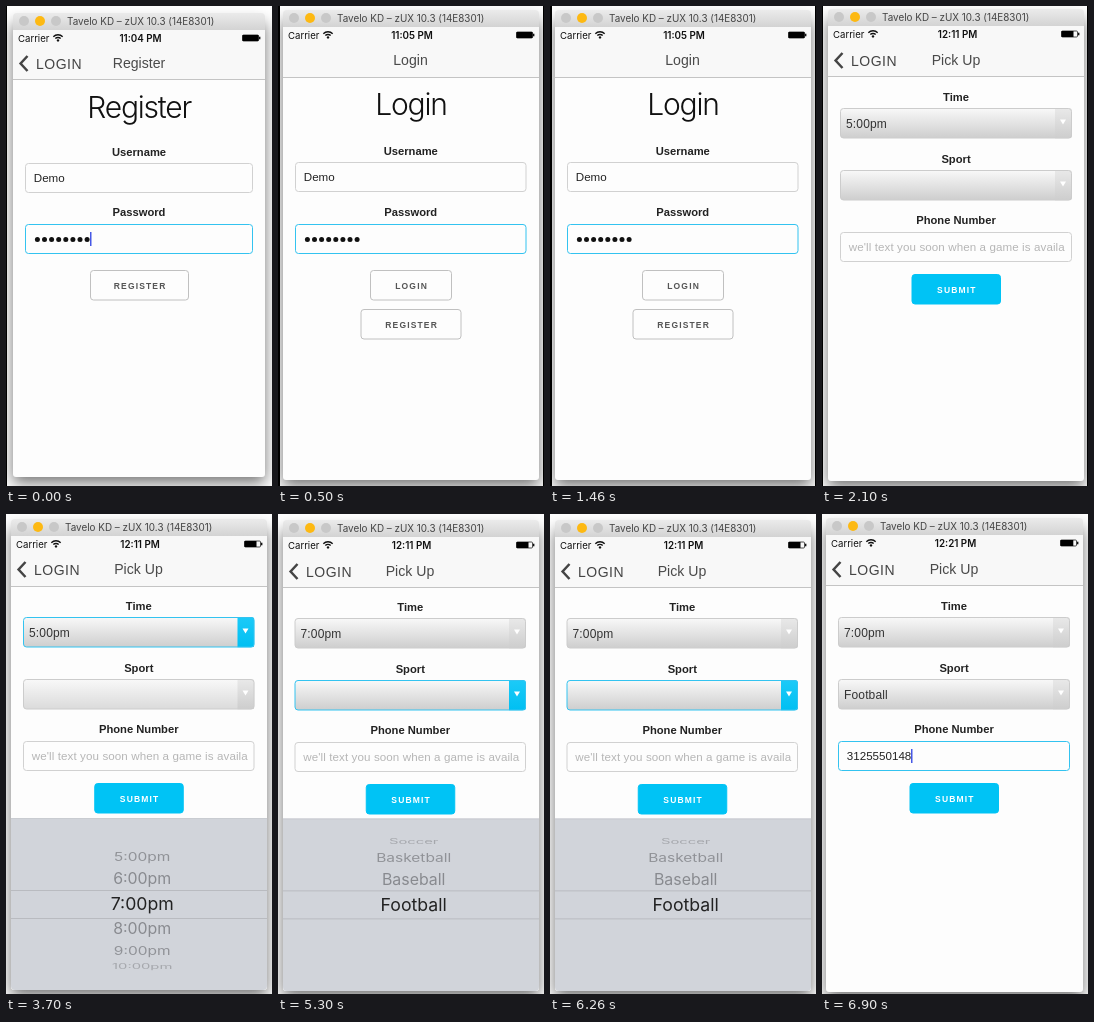
These frames come from a looping animation (266x480 px, 8000 ms). An HTML page with a canvas:

```html
<!DOCTYPE html>
<html lang="en">
<head>
<meta charset="utf-8">
<title>Pick-up game app</title>
<style>
html, body { margin: 0; width: 100%; height: 100%; overflow: hidden; background: #fff; }
canvas { display: block; width: 266px; height: 480px; }
</style>
</head>
<body>
<canvas id="stage"></canvas>
<script>
const W = 266, H = 480, LOOP = 8000;
const SANS = '"Liberation Sans", Arial, sans-serif';
const UI = 'Inter, Roboto, sans-serif';
const CYAN = '#00c3f5', FOCUS = '#33c3f0', INK = '#222';
const canvas = document.getElementById('stage');
const ctx = canvas.getContext('2d');
const dpr = window.devicePixelRatio || 1;
canvas.width = Math.round(W * dpr);
canvas.height = Math.round(H * dpr);

// y is the middle of the capitals
function text(str, x, y, size, o = {}) {
  ctx.font = `${o.weight || 400} ${size}px ${o.font || SANS}`;
  ctx.textAlign = o.align || 'center';
  ctx.letterSpacing = (o.gap || 0) + 'px';
  ctx.fillStyle = o.color || INK;
  ctx.fillText(str, x, y + size * 0.36);
  ctx.letterSpacing = '0px';
}

function rect(x0, y0, x1, y1, fill) {
  ctx.fillStyle = fill;
  ctx.fillRect(x0, y0, x1 - x0, y1 - y0);
}

function rounded(x0, y0, x1, y1, radii, fill) {
  ctx.beginPath();
  ctx.roundRect(x0, y0, x1 - x0, y1 - y0, radii);
  ctx.fillStyle = fill;
  ctx.fill();
}

function box(x0, y0, x1, y1, fill, stroke) {
  ctx.beginPath();
  ctx.roundRect(x0 + 0.5, y0 + 0.5, x1 - x0 - 1, y1 - y0 - 1, 3);
  if (fill) { ctx.fillStyle = fill; ctx.fill(); }
  if (stroke) { ctx.strokeStyle = stroke; ctx.lineWidth = 1; ctx.stroke(); }
}

function dot(x, y, r, fill) {
  ctx.beginPath();
  ctx.arc(x, y, r, 0, Math.PI * 2);
  ctx.fillStyle = fill;
  ctx.fill();
}

function shade(y0, y1, a, b) {
  const g = ctx.createLinearGradient(0, y0, 0, y1);
  g.addColorStop(0, a);
  g.addColorStop(1, b);
  return g;
}

function line(points, color, width) {
  ctx.beginPath();
  points.forEach(([x, y]) => ctx.lineTo(x, y));
  ctx.strokeStyle = color;
  ctx.lineWidth = width;
  ctx.stroke();
}

function wifi(x, y) {
  ctx.strokeStyle = '#111';
  ctx.lineWidth = 1.4;
  for (const r of [3.8, 6.6]) {
    ctx.beginPath();
    ctx.arc(x, y, r, -Math.PI * 0.75, -Math.PI * 0.25);
    ctx.stroke();
  }
  dot(x, y - 0.9, 1.2, '#111');
}

function battery(right, y, level) {
  const left = right - 19;
  ctx.beginPath();
  ctx.roundRect(left + 0.5, y - 3, 16, 6, 1);
  ctx.strokeStyle = '#222';
  ctx.lineWidth = 0.8;
  ctx.stroke();
  rect(left + 0.5, y - 3, left + 0.5 + 16 * level, y + 3, '#000');
  rect(right - 2, y - 1.3, right - 0.6, y + 1.3, '#111');
}

function chrome(s) {
  const [x0, x1, bottom] = s.win, t = s.top, top = t - 8, mid = s.mid;
  rect(0, 0, W, H, '#fff');
  ctx.save();
  ctx.shadowColor = 'rgba(0,0,0,.55)';
  ctx.shadowBlur = 15 * dpr;
  ctx.shadowOffsetY = 6 * dpr;
  rounded(x0, top + 4, x1, bottom, [0, 0, 3, 3], '#fdfdfd');
  ctx.restore();

  rounded(x0, top, x1, top + 17, [4, 4, 0, 0], shade(top, top + 17, '#ebebeb', '#d3d3d3'));
  ['#c8c8c8', '#fdb913', '#c8c8c8'].forEach((c, i) => dot(x0 + 11 + 16 * i, t, 5, c));
  text('Tavelo KD – zUX 10.3 (14E8301)', x0 + 54, t, 9.9, { font: UI, align: 'left', color: '#444' });

  rect(x0, t + 9, x1, s.rule, '#f8f8f8');
  rect(x0, s.rule - 1, x1, s.rule, '#c4c4c4');
  text('Carrier', x0 + 5, t + 17.3, 9.6, { font: UI, align: 'left', color: '#111' });
  wifi(x0 + 45, t + 20.3);
  text(s.clock, mid + 1.5, t + 17.3, 9.8, { font: UI, weight: 600, color: '#111' });
  battery(x1 - 4, t + 17, s.charge);

  text(s.title, mid, s.bar, 14.1, { color: '#4a4a4a' });
  if (s.back) {
    line([[x0 + 14.5, s.bar - 7], [x0 + 7.6, s.bar + 0.5], [x0 + 14.5, s.bar + 8]], '#444', 2.5);
    text('LOGIN', x0 + 23, s.bar + 0.5, 14, { align: 'left', gap: 0.5, color: '#444' });
  }
  const [left, right] = s.edges || [0, 0];
  rect(0, 0, left, H, '#000');
  rect(W - right, 0, W, H, '#000');
}

const label = (str, x, y) => text(str, x, y, 11.2, { weight: 700 });

function field(x0, x1, y, str, o = {}) {
  box(x0, y, x1, y + 30, '#fdfdfd', o.focus ? FOCUS : '#d1d1d1');
  text(str, x0 + 8.8, y + 15.2, 11.6, { align: 'left', gap: o.gap, color: o.color });
}

function caret(x, y) {
  rect(x, y - 7, x + 1.5, y + 7, '#4658e6');
}

function password(x0, x1, y) {
  field(x0, x1, y, '', { focus: true });
  for (let i = 0; i < 8; i++) dot(x0 + 12.4 + 7.1 * i, y + 15.4, 2.5, '#111');
}

function button(x0, x1, y, str, solid) {
  box(x0, y, x1, y + 30.5, solid ? CYAN : '#fdfdfd', solid ? CYAN : '#c0c0c0');
  text(str, (x0 + x1) / 2 + 0.6, y + 15.6, 8.5, { weight: 700, gap: 1.15, color: solid ? '#fff' : '#555' });
}

function select(x0, x1, y, str, o = {}) {
  const y1 = y + 30.5, cut = x1 - 17;
  box(x0, y, x1, y1, shade(y, y1, '#f9f9f9', o.pale ? '#dadada' : '#cdcdcd'));
  ctx.save();
  ctx.beginPath();
  ctx.roundRect(x0, y, x1 - x0, y1 - y, 3);
  ctx.clip();
  rect(cut, y, x1, y1, o.focus ? shade(y, y1, '#1ccaf8', '#00bff2') : shade(y, y1, '#e9e9e9', '#cdcdcd'));
  ctx.restore();
  box(x0, y, x1, y1, null, o.focus ? FOCUS : '#cccccc');
  const cx = x1 - 9, cy = y + 11.5;
  ctx.beginPath();
  ctx.moveTo(cx - 3, cy);
  ctx.lineTo(cx + 3, cy);
  ctx.lineTo(cx, cy + 5);
  ctx.fillStyle = '#fff';
  ctx.fill();
  text(str, x0 + 6, y + 15.5, 12, { align: 'left', gap: 0.15, color: '#333' });
}

// Wheel rows shrink, flatten and fade away from the chosen one
function picker(s, top, items, chosen) {
  const [x0, x1, bottom] = s.win, mid = top + 86.3;
  const drop = [0, 25, 46.7, 62.5], size = [17.7, 15.9, 15.5, 14.8];
  const flat = [1, 0.96, 0.73, 0.48], tone = [INK, '#888a8f', '#909297', '#a5a7ac'];
  rounded(x0, top, x1, bottom, [0, 0, 4, 4], '#d1d4da');
  rect(x0, top, x1, top + 1, '#c9ccd1');
  for (const d of [-14.3, 13.7]) rect(x0, mid + d, x1, mid + d + 0.8, '#b3b6bb');
  ctx.save();
  ctx.beginPath();
  ctx.rect(x0, top + 18, x1 - x0, 134.5);
  ctx.clip();
  items.forEach((item, i) => {
    const n = Math.abs(i - chosen), side = Math.sign(i - chosen);
    ctx.save();
    ctx.translate(s.mid + 3.7, mid + side * drop[n] - 0.4);
    ctx.scale(1, flat[n]);
    text(item, 0, 0, size[n], { font: UI, color: tone[n] });
    ctx.restore();
  });
  ctx.restore();
}

// y: the three form rows and the button
function game(s) {
  const [x0, x1] = s.form, [a, b, c, d] = s.y, mid = (x0 + x1) / 2;
  label('Time', mid, a - 11.5);
  select(x0, x1, a, s.time, { focus: s.focus === 1 });
  label('Sport', mid, b - 11.5);
  select(x0, x1, b, s.sport, { focus: s.focus === 2, pale: s.focus === 1 });
  label('Phone Number', mid, c - 12);
  if (s.phone) {
    field(x0, x1, c, s.phone, { focus: true });
    caret(x0 + 73, c + 15);
  } else {
    field(x0, x1, c, "we'll text you soon when a game is availa", { gap: 0.09, color: '#b6b6b6' });
  }
  button(mid - 44.5, mid + 45, d, 'SUBMIT', true);
}

const heading = (str, x, y) => text(str, x, y, 30, { font: UI, weight: 300, gap: -1.2, color: '#111' });

function account(s) {
  const [x0, x1] = s.form, [a, b] = s.y, mid = (x0 + x1) / 2;
  heading(s.title, mid + 0.2, s.top + 86.3);
  label('Username', mid, a - 11);
  field(x0, x1, a, 'Demo');
  label('Password', mid, b - 11.7);
  password(x0, x1, b);
}

const screens = [
  { at: 0, win: [7, 259, 471], top: 15, mid: 133, bar: 57, rule: 74, clock: '11:04 PM', charge: 1, edges: [1, 0],
    title: 'Register', back: true, form: [19, 247], y: [157, 218],
    draw(s) {
      account(s);
      caret(84, 233);
      button(84, 183, 264, 'REGISTER');
    } },
  { at: 500, win: [5, 261, 474], top: 12, mid: 132.5, bar: 54, rule: 72, clock: '11:05 PM', charge: 1, edges: [2, 1],
    title: 'Login', form: [17, 248.5], y: [156, 218],
    draw(s) {
      account(s);
      button(92, 174, 264, 'LOGIN');
      button(82.5, 183.5, 303, 'REGISTER');
    } },
  { at: 2100, win: [6, 262, 475], top: 11, mid: 134, bar: 54, rule: 71, clock: '12:11 PM', charge: 0.75, edges: [1, 1],
    title: 'Pick Up', back: true, form: [18, 250], y: [102, 164, 226, 268],
    time: '5:00pm', sport: '', draw: game },
  { at: 3700, win: [5, 261, 476], top: 13, mid: 132.5, bar: 55, rule: 73, clock: '12:11 PM', charge: 0.75,
    title: 'Pick Up', back: true, form: [17, 248.5], y: [103, 165, 227, 269],
    time: '5:00pm', sport: '', focus: 1,
    draw(s) {
      game(s);
      picker(s, 304, [5, 6, 7, 8, 9, 10].map(h => h + ':00pm'), 2);
    } },
  { at: 5300, win: [5, 261, 477], top: 14, mid: 132, bar: 57, rule: 74, clock: '12:11 PM', charge: 0.75,
    title: 'Pick Up', back: true, form: [16.5, 248], y: [104, 166, 228, 270],
    time: '7:00pm', sport: '', focus: 2,
    draw(s) {
      game(s);
      picker(s, 304.5, ['Soccer', 'Basketball', 'Baseball', 'Football'], 3);
    } },
  { at: 6900, win: [4, 261, 478], top: 12, mid: 132, bar: 55, rule: 72, clock: '12:21 PM', charge: 0.8,
    title: 'Pick Up', back: true, form: [16, 248], y: [103, 165, 227, 269],
    time: '7:00pm', sport: 'Football', phone: '3125550148', draw: game }
];

let shown = null;
function tick() {
  const t = performance.now() % LOOP;
  const s = screens.filter(v => v.at <= t).pop();
  if (s !== shown) {
    shown = s;
    ctx.setTransform(dpr, 0, 0, dpr, 0, 0);
    chrome(s);
    s.draw(s);
  }
  requestAnimationFrame(tick);
}
tick();
</script>
</body>
</html>
```
